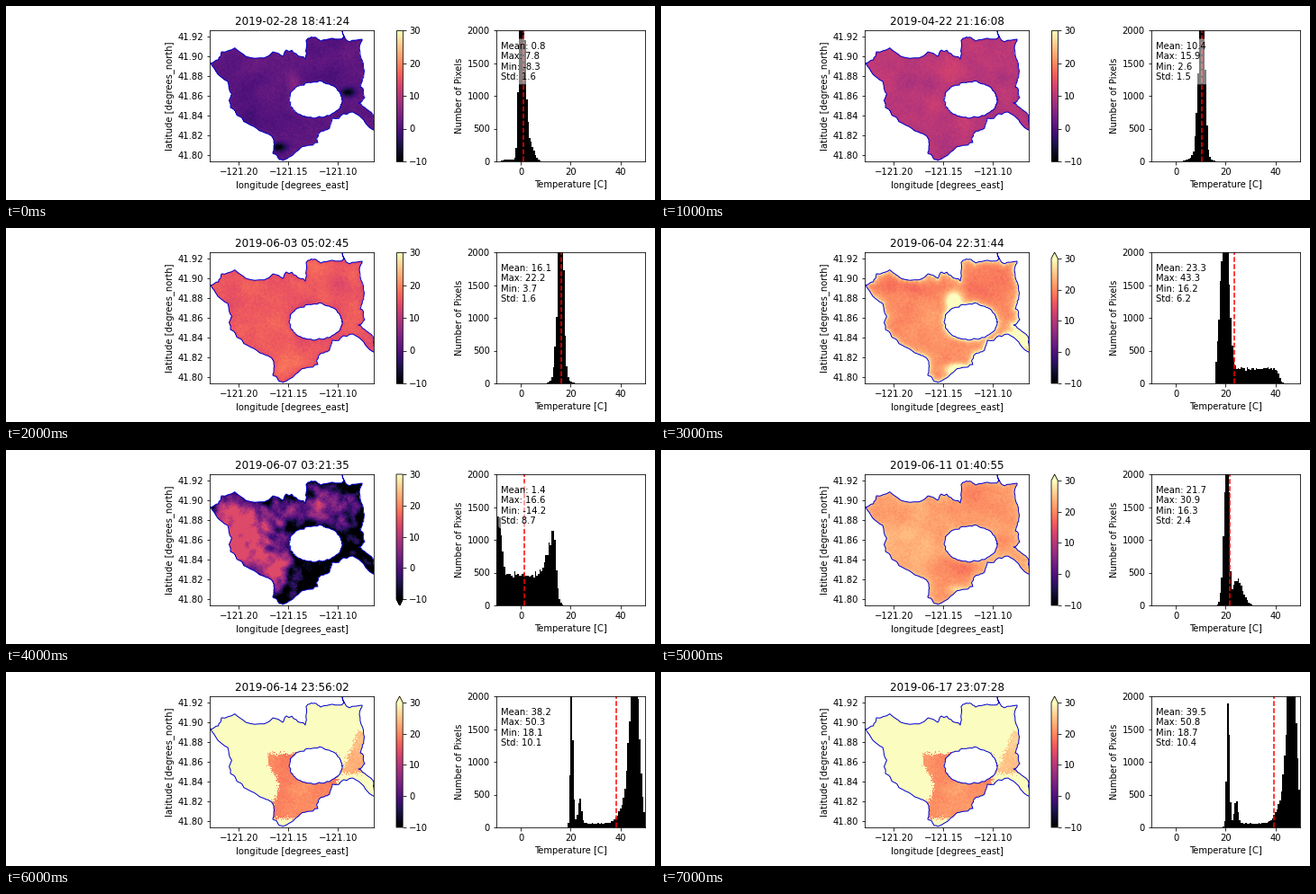
Write a matplotlib script that moves like this. It is 720 px wide and 216 px high and loops after 8000 ms.

```python
import numpy as np
import matplotlib.pyplot as plt
from matplotlib.animation import FuncAnimation
from matplotlib.cm import ScalarMappable
from matplotlib.colors import Normalize
from matplotlib.path import Path
from matplotlib.ticker import MultipleLocator

W, H = 720, 216
LEFT, RIGHT, TOP, BOTTOM = 226.4, 408.2, 27, 173
PX_PER_DEG = 1098

plt.rcParams.update({"font.family": "DejaVu Sans", "font.size": 10})

# Capes and bays in stage pixels, clockwise from the western tip
CAPES = [
    (227, 64), (239, 51), (266, 56), (307, 56), (311, 49), (332, 59),
    (335, 36), (349, 39), (375, 34), (373, 28), (395, 37), (392, 47),
    (397, 76), (393, 90), (398, 102), (391, 108), (408, 123), (410, 139),
    (388, 120), (362, 125), (359, 136), (347, 142), (346, 152), (324, 161),
    (307, 172), (296, 164), (297, 151), (289, 142), (262, 125), (249, 113),
    (246, 84),
]


def lon(x):
    return -121.20 + (x - 258.4) / PX_PER_DEG


def lat(y):
    return 41.80 + (166 - y) / PX_PER_DEG


def roughen(points, seed, amount=0.1, levels=3):
    """Close a polygon and displace midpoints, finer at each level."""
    rng = np.random.default_rng(seed)
    line = np.array(points + points[:1], float)
    for _ in range(levels):
        step = np.diff(line, axis=0)
        normal = step[:, ::-1] * (-1, 1)
        shift = rng.normal(0, amount, (len(step), 1))
        mid = line[:-1] + step / 2 + normal * shift
        line = np.insert(line, np.arange(1, len(line)), mid, axis=0)
    return line


angles = np.linspace(0, 2 * np.pi, 20, endpoint=False)
oval = [(343.5 + 29.5 * np.cos(a), 104.5 + 20 * np.sin(a)) for a in angles]
coast, island = roughen(CAPES, 3), roughen(oval, 5)

COLS, ROWS = 182, 146
X, Y = np.meshgrid(LEFT + np.arange(COLS) + 0.5, TOP + np.arange(ROWS) + 0.5)


def inside(line):
    xy = np.column_stack([X.ravel(), Y.ravel()])
    return Path(line).contains_points(xy).reshape(X.shape)


def haze(seed, size):
    """Smooth random field with unit spread."""
    noise = np.random.default_rng(seed).normal(size=X.shape)
    fy = np.fft.fftfreq(ROWS)[:, None]
    fx = np.fft.fftfreq(COLS)[None, :]
    low = np.exp(-2 * (np.pi * size) ** 2 * (fx ** 2 + fy ** 2))
    out = np.fft.ifft2(np.fft.fft2(noise) * low).real
    return (out - out.mean()) / out.std()


def blob(x, y, rx, ry):
    return np.exp(-((X - x) / rx) ** 2 - ((Y - y) / ry) ** 2)


water = inside(coast) & ~inside(island)
shore = np.full(X.shape, 1e6)
for ex, ey in np.vstack([coast, island]):
    shore = np.minimum(shore, np.hypot(X - ex, Y - ey))
rim = np.exp(-shore / 2.2)
grain = haze(1, 0.6)


def calm(base, seed, spread=0.6):
    return base + spread * haze(seed, 7) + 0.4 * grain


# Surface temperatures
def winter():
    return (calm(0.9, 2) + rim + 4 * blob(319, 86, 7, 12)
            - 11 * blob(303, 157, 9, 5) - 10 * blob(380, 96, 8, 5))


def spring():
    return calm(10.5, 4) - 1.5 * rim


def mild_night():
    return calm(16.1, 6) - 2.5 * rim + 2.5 * blob(307, 152, 16, 12)


def warm_day():
    return (calm(20.5, 7) + 13 * rim
            - 2.5 * blob(352, 60, 22, 24) - 2.3 * blob(260, 66, 42, 10)
            + 16 * blob(325, 82, 9, 11) + 13 * blob(328, 157, 13, 6)
            + 14 * blob(399, 122, 12, 14))


def cloudy():
    t = (-11 + 3.5 * haze(9, 3) + grain - 7 * rim
         + 31 * blob(252, 95, 58, 48) + 20 * blob(300, 135, 14, 20)
         + 16 * blob(355, 62, 38, 20))
    return np.clip(t, -14.2, 14)


def warm_evening():
    return (calm(21.9, 10) + 3.5 * rim + 2 * blob(283, 95, 22, 25)
            - 2.6 * blob(345, 55, 18, 18) - 3 * blob(336, 132, 18, 12)
            + 5 * blob(328, 155, 12, 5))


def hot(bay, arm):
    """Hot land glow with a cool bay in the south and a milder east arm."""
    x, y = X + 1.5 * haze(12, 0.1), Y + 1.5 * haze(13, 0.1)
    t = np.full(X.shape, 45.0)
    t[(x > 372 + 0.42 * (112 - y)) & (y > 66) & (y < 113)] = arm
    west = 297 - 6 * np.cos((y - 97) / 10)
    t[(x > west) & (x < 368) & (y > 91) & (y < 163)] = bay
    return calm(t, 11)


# Histograms
EDGES = np.linspace(-10, 50, 101)
T = (EDGES[:-1] + EDGES[1:]) / 2


def bell(height, mid, left, right):
    return height * np.exp(-0.5 * ((T - mid) / np.where(T < mid, left, right)) ** 2)


def shelf(height, start, end, soft=0.5):
    rise = 1 / (1 + np.exp((start - T) / soft))
    return height * rise / (1 + np.exp((T - end) / soft))


def hot_counts(bay, land):
    return (bell(1950, bay, 0.5, 0.6) + bell(350, bay + 3.3, 0.7, 0.7)
            + shelf(60, 20, 50) + bell(2700, land, 1.8, 1.7)
            + bell(300, land - 3.6, 2.5, 3))


def scene(when, stats, extend, field, counts):
    _, high, low, _ = stats
    rng = np.random.default_rng(int(when[-2:]))
    counts = counts * rng.normal(1, 0.05, T.size)
    counts = np.where((T > low - 0.4) & (T < high + 0.4), counts, 0)
    return when, stats, extend, np.ma.array(field, mask=~water), counts


SCENES = [
    scene("2019-02-28 18:41:24", (0.8, 7.8, -8.3, 1.6), "neither", winter(),
          bell(4000, 0, 0.75, 1.2) + bell(350, 2.5, 2, 2) + shelf(25, -8, 7)),
    scene("2019-04-22 21:16:08", (10.4, 15.9, 2.6, 1.5), "neither", spring(),
          bell(3000, 10.4, 1.2, 1.1) + bell(150, 10, 3, 2.3)),
    scene("2019-06-03 05:02:45", (16.1, 22.2, 3.7, 1.6), "neither", mild_night(),
          bell(3200, 16.2, 1.25, 0.95) + bell(150, 16, 2.4, 2.3)),
    scene("2019-06-04 22:31:44", (23.3, 43.3, 16.2, 6.2), "max", warm_day(),
          bell(2700, 20, 1.9, 1.4) + shelf(225, 22, 41.6)),
    scene("2019-06-07 03:21:35", (1.4, 16.6, -14.2, 8.7), "min", cloudy(),
          bell(850, -8.9, 0.9, 1.1) + bell(620, 13.4, 2.4, 0.6)
          + shelf(470, -14, 14.8)),
    scene("2019-06-11 01:40:55", (21.7, 30.9, 16.3, 2.4), "max", warm_evening(),
          bell(2600, 20.9, 1.3, 0.6) + bell(400, 24.7, 2, 2.2)),
    scene("2019-06-14 23:56:02", (38.2, 50.3, 18.1, 10.1), "max", hot(20, 24),
          hot_counts(20.4, 45.8)),
    scene("2019-06-17 23:07:28", (39.5, 50.8, 18.7, 10.4), "max", hot(21, 25.5),
          hot_counts(21, 46.6)),
]

fig = plt.figure(figsize=(W / 72, H / 72), dpi=72, facecolor="white")


def add_axes(left, right):
    return fig.add_axes([left / W, 1 - BOTTOM / H,
                         (right - left) / W, (BOTTOM - TOP) / H])


norm = Normalize(-10, 30)
lake = add_axes(LEFT, RIGHT)
extent = (lon(LEFT), lon(RIGHT), lat(BOTTOM), lat(TOP))
image = lake.imshow(SCENES[0][3], cmap="magma", norm=norm, extent=extent,
                    aspect="auto", interpolation="nearest")
for line in (coast, island):
    lake.plot(lon(line[:, 0]), lat(line[:, 1]), color="mediumblue", lw=1)
lake.set(xlim=extent[:2], ylim=extent[2:], xlabel="longitude [degrees_east]",
         ylabel="latitude [degrees_north]")
lake.xaxis.set_major_locator(MultipleLocator(0.05))
lake.yaxis.set_major_locator(MultipleLocator(0.02))
lake.ticklabel_format(useOffset=False)
title = lake.set_title("")

bars = {}
for kind in ("neither", "min", "max"):
    bars[kind] = add_axes(433, 440.2)
    fig.colorbar(ScalarMappable(norm, "magma"), cax=bars[kind], extend=kind,
                 ticks=range(-10, 31, 10))

hist = add_axes(543.8, 709.1)
steps = hist.stairs(SCENES[0][4], EDGES, fill=True, color="k")
mean_line = hist.axvline(0, color="r", ls="--", lw=1.5)
note = hist.text(-8, 1215, "", va="bottom",
                 bbox=dict(boxstyle="round", fc="white", ec="none", alpha=0.5))
hist.set(xlim=(-10, 50), ylim=(0, 2000), xticks=(0, 20, 40),
         yticks=range(0, 2001, 500), xlabel="Temperature [C]",
         ylabel="Number of Pixels")


def draw(i):
    when, stats, extend, field, counts = SCENES[i]
    title.set_text(when)
    image.set_data(field)
    for kind, ax in bars.items():
        ax.set_visible(kind == extend)
    steps.set_data(values=counts)
    mean_line.set_xdata([stats[0]] * 2)
    names = ("Mean", "Max", "Min", "Std")
    note.set_text("\n".join(f"{n}: {v}" for n, v in zip(names, stats)))
    return []


anim = FuncAnimation(fig, draw, frames=len(SCENES), interval=1000,
                     init_func=lambda: draw(0), repeat=True, repeat_delay=0)
plt.show()
```
